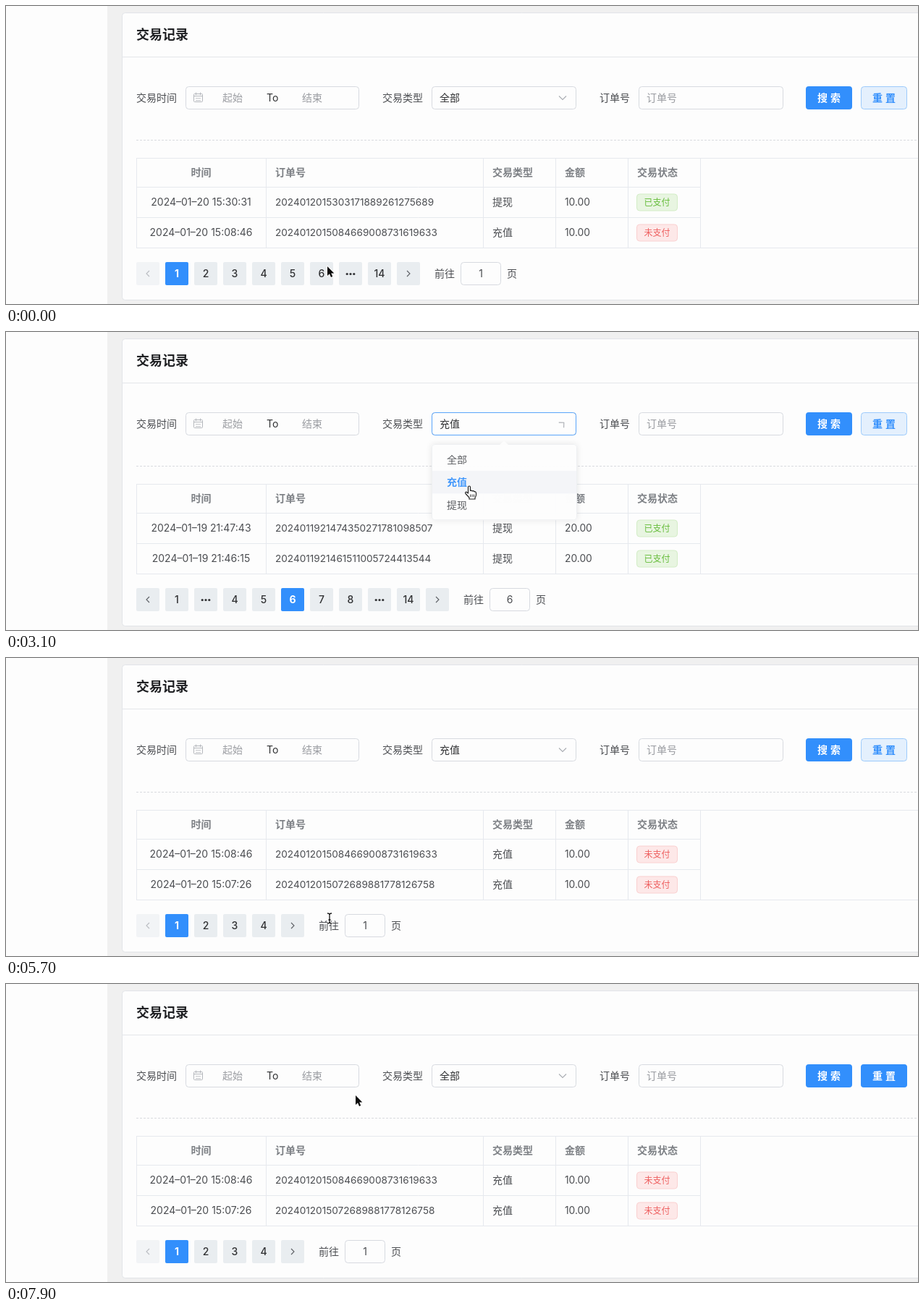
Animation of 1260 by 412 pixels, one loop 8000 ms. Source, as an HTML page with a canvas:

```html
<!DOCTYPE html>
<html lang="zh-CN">
<head>
<meta charset="utf-8">
<title>交易记录</title>
<style>
html, body { margin: 0; width: 100%; height: 100%; overflow: hidden; background: #fdfdfd; }
canvas { display: block; }
</style>
</head>
<body>
<canvas id="stage" width="1260" height="412"></canvas>
<script>
const ctx = document.getElementById('stage').getContext('2d');
const LOOP = 8000;
const FONT = 'Inter, "Noto Sans CJK SC", "Noto Sans CJK", sans-serif';
const BLUE = '#328ffc', LINE = '#e6e9ee', BORDER = '#d7dae0', PAPER = '#fdfdfd';
const INK = '#303133', BODY = '#4b4d51', MUTED = '#9b9da2';

// Moments at which the interface reacts
const PAGE_CLICK = 500, OPEN = 2247, PICK = 3050, SEARCH = 4750, RESULT = 4900, RESET = 6700;

const PAGES = [
  { current: '1', pager: ['<', '1', '2', '3', '4', '5', '6', '…', '14', '>'], rows: [
    ['2024–01–20 15:30:31', '2024012015303171889261275689', '提现', '10.00', true],
    ['2024–01–20 15:08:46', '2024012015084669008731619633', '充值', '10.00', false]] },
  { current: '6', pager: ['<', '1', '…', '4', '5', '6', '7', '8', '…', '14', '>'], rows: [
    ['2024–01–19 21:47:43', '2024011921474350271781098507', '提现', '20.00', true],
    ['2024–01–19 21:46:15', '2024011921461511005724413544', '提现', '20.00', true]] },
  { current: '1', pager: ['<', '1', '2', '3', '4', '>'], rows: [
    ['2024–01–20 15:08:46', '2024012015084669008731619633', '充值', '10.00', false],
    ['2024–01–20 15:07:26', '2024012015072689881778126758', '充值', '10.00', false]] }
];

// Pointer stops: time, x, y
const PATH = [
  [0, 444, 360], [400, 441, 367], [1300, 441, 367], [2050, 728, 133], [2500, 728, 133],
  [2850, 640, 214], [3150, 640, 214], [3700, 362, 366], [4020, 417, 356], [4100, 417, 356],
  [4500, 1132, 128], [4950, 1132, 128], [5500, 447, 360], [5750, 447, 360],
  [6350, 1194, 130], [7150, 1194, 130], [7700, 483, 154], [8000, 483, 154]
];

const clamp = v => Math.min(1, Math.max(0, v));
const ramp = (t, start, length) => clamp((t - start) / length);
const smooth = p => p * p * (3 - 2 * p);
const easeOut = p => 1 - (1 - p) ** 3;
const pulse = (t, on, off, length = 150) => ramp(t, on, length) - ramp(t, off, length);

function pointerAt(t) {
  const i = Math.max(1, PATH.findIndex(k => k[0] > t));
  const [t0, x0, y0] = PATH[i - 1], [t1, x1, y1] = PATH[i];
  const p = smooth(ramp(t, t0, t1 - t0));
  return [x0 + (x1 - x0) * p, y0 + (y1 - y0) * p];
}

function text(str, x, middle, color = BODY, size = 14, weight = 400, align = 'left') {
  ctx.font = `${weight} ${size}px ${FONT}`;
  ctx.textAlign = align;
  ctx.fillStyle = color;
  ctx.fillText(str, x, middle + size * 0.37);
}

function box(x, y, w, h, fill, stroke, radius = 4) {
  const inset = stroke ? 0.5 : 0;
  ctx.beginPath();
  ctx.roundRect(x + inset, y + inset, w - 2 * inset, h - 2 * inset, radius);
  if (fill) { ctx.fillStyle = fill; ctx.fill(); }
  if (stroke) { ctx.strokeStyle = stroke; ctx.lineWidth = 1; ctx.stroke(); }
}

function line(points, color, width = 1) {
  ctx.beginPath();
  points.forEach(([x, y]) => ctx.lineTo(x, y));
  ctx.strokeStyle = color;
  ctx.lineWidth = width;
  ctx.stroke();
}

function faded(alpha, draw) {
  ctx.save();
  ctx.globalAlpha *= alpha;
  draw();
  ctx.restore();
}

function chevron(x, y, angle, size, color) {
  ctx.save();
  ctx.translate(x, y);
  ctx.rotate(angle);
  line([[-size, -size / 2], [0, size / 2], [size, -size / 2]], color, 1.1);
  ctx.restore();
}

function drawFrame() {
  ctx.fillStyle = PAPER;
  ctx.fillRect(0, 0, 1260, 412);
  ctx.fillStyle = '#f0f0f0';
  ctx.fillRect(140, 0, 1120, 412);
  box(160, 9, 1120, 398, PAPER, '#e2e4e8');
  line([[160, 70.5], [1260, 70.5]], '#e4e6ea');
  text('交易记录', 180, 39.3, '#1f2023', 18, 700);
  ctx.setLineDash([3, 2]);
  line([[180, 185.5], [1260, 185.5]], '#d9dbdf');
  ctx.setLineDash([]);
}

function drawCalendar(x, y) {
  box(x, y + 1, 13, 12, null, '#b4b7bc', 1);
  line([[x, y + 4.5], [x + 13, y + 4.5]], '#b4b7bc');
  for (const dx of [3.5, 9.5]) line([[x + dx, y - 0.5], [x + dx, y + 3]], '#b4b7bc');
  for (const dy of [7.5, 10.5]) line([[x + 3, y + dy], [x + 10, y + dy]], '#c4c6ca');
}

function buttonLabel(first, second, x, color) {
  text(first, x + 16, 127, color, 14, 700);
  text(second, x + 34, 127, color, 14, 700);
}

function drawFilters(t) {
  text('交易时间', 180, 127);
  box(248, 111, 240, 32, PAPER, BORDER);
  drawCalendar(259, 120);
  text('起始', 299, 127, MUTED);
  text('To', 360, 127, INK);
  text('结束', 409, 127, MUTED);

  text('交易类型', 520, 127);
  box(588, 111, 200, 32, PAPER, BORDER);
  faded(pulse(t, 1950, 2400), () => box(588, 111, 200, 32, null, '#b4b7bd'));
  faded(pulse(t, 2310, SEARCH), () => box(588, 111, 200, 32, null, '#5aa5fa'));
  text(t > PICK && t < RESET ? '充值' : '全部', 599, 127, INK);
  const turn = p => 1 - (1 - p) ** 1.6;
  const turned = turn(ramp(t, OPEN, 300)) - turn(ramp(t, PICK, 300));
  chevron(769, 127, -Math.PI * turned, 5, '#a9acb2');

  text('订单号', 820, 127);
  box(874, 111, 200, 32, PAPER, BORDER);
  text('订单号', 885, 127, MUTED);

  box(1105, 111, 64, 32, BLUE);
  const searchHover = Math.max(pulse(t, 4380, 5000), pulse(t, 6180, 6390));
  faded(searchHover * 0.3, () => box(1105, 111, 64, 32, '#fff'));
  buttonLabel('搜', '索', 1105, '#fff');
  box(1181, 111, 64, 32, '#e4f0fd', '#9ccafb');
  buttonLabel('重', '置', 1181, BLUE);
  faded(ramp(t, 6410, 200), () => {
    box(1181, 111, 64, 32, BLUE);
    buttonLabel('重', '置', 1181, '#fff');
  });
}

function drawTag(paid, y) {
  const [fill, stroke, color] = paid
    ? ['#e8f5e1', '#d3edc6', '#67bd3c'] : ['#fde8e8', '#fad0d0', '#ee5f5f'];
  box(871, y - 12, 57, 24, fill, stroke);
  text(paid ? '已支付' : '未支付', 899.5, y, color, 12, 500, 'center');
}

function drawTable(rows) {
  for (const [y, right] of [[210, 1260], [250, 959], [292, 959], [334, 1260]])
    line([[180, y + 0.5], [right, y + 0.5]], LINE);
  for (const x of [180, 359, 659, 759, 859, 959])
    line([[x + 0.5, 210], [x + 0.5, 334]], LINE);

  text('时间', 269.5, 230, '#7d8085', 14, 700, 'center');
  [['订单号', 372], ['交易类型', 672], ['金额', 772], ['交易状态', 872]]
    .forEach(([label, x]) => text(label, x, 230, '#7d8085', 14, 700));

  rows.forEach(([time, order, type, amount, paid], i) => {
    const y = 271 + 42 * i;
    text(time, 269.5, y, BODY, 14, 400, 'center');
    text(order, 372, y, BODY, 13.6);
    text(type, 672, y);
    text(amount, 772, y, BODY, 13.8);
    drawTag(paid, y + 0.5);
  });
}

function drawPager({ current, pager }) {
  pager.forEach((label, i) => {
    const x = 180 + 40 * i, middle = x + 16, active = label === current;
    const disabled = label === '<' && current === '1';
    box(x, 354, 32, 32, active ? BLUE : disabled ? '#f2f4f6' : '#e9edf0', null, 2);
    if (label === '<') chevron(middle, 370, Math.PI / 2, 4, disabled ? '#b9bcc2' : '#5c5f64');
    else if (label === '>') chevron(middle, 370, -Math.PI / 2, 4, '#5c5f64');
    else if (label === '…') {
      ctx.fillStyle = INK;
      for (const dx of [-4.8, 0, 4.8]) {
        ctx.beginPath();
        ctx.arc(middle + dx, 370.5, 1.6, 0, 7);
        ctx.fill();
      }
    } else text(label, middle, 370, active ? '#fff' : INK, 14, active ? 700 : 500, 'center');
  });
  const x = 192 + 40 * pager.length;
  text('前往', x, 370);
  box(x + 36, 354, 56, 32, PAPER, BORDER);
  text(current, x + 64, 370, BODY, 14, 400, 'center');
  text('页', x + 100, 370);
}

function drawOptions(t, pointerY) {
  const shown = easeOut(ramp(t, OPEN, 300)) * (1 - smooth(ramp(t, PICK, 300)));
  if (!shown) return;
  ctx.save();
  ctx.globalAlpha = shown;
  ctx.translate(0, 155);
  ctx.scale(1, shown);
  ctx.shadowColor = 'rgba(0,0,0,.1)';
  ctx.shadowBlur = 10;
  box(588, 0, 201, 114, PAPER);
  ctx.shadowColor = 'transparent';
  box(588, 0, 201, 114, PAPER, '#eceef1');
  ctx.beginPath();
  ctx.moveTo(682, 1);
  ctx.lineTo(688, -5);
  ctx.lineTo(694, 1);
  ctx.fillStyle = PAPER;
  ctx.fill();
  ['全部', '充值', '提现'].forEach((label, i) => {
    const top = 6 + 34 * i;
    if (pointerY > 155 + top && pointerY < 189 + top) {
      ctx.fillStyle = '#f3f5f8';
      ctx.fillRect(589, top, 199, 34);
    }
    const chosen = i === (t > PICK ? 1 : 0);
    text(label, 609, top + 17, chosen ? BLUE : BODY, 14, chosen ? 700 : 400);
  });
  ctx.restore();
}

const ARROW = new Path2D('M0 0V13L3 10.3L5 15L7.2 14L5.2 9.5H9.3Z');
const HAND = new Path2D('M-1.5 9V.5Q-1.5-1 0-1Q1.5-1 1.5.5V5.5Q3 4.5 4.3 6Q6 5.2 7 6.8Q9.5 6.3 9.5 9V11Q9.5 13 8 15V17H0V15L-5 9.5Q-6 7.5-4.2 7Z');
const CREASES = new Path2D('M1.7 10.5V14M4.1 10.5V14M6.5 10.5V14');
const BEAM = new Path2D('M-3-7Q0-7 0-5Q0-7 3-7M0-5V5M-3 7Q0 7 0 5Q0 7 3 7M-1.5 2H1.5');

function drawPointer(t, x, y) {
  const inside = (x0, y0, x1, y1) => x >= x0 && x <= x1 && y >= y0 && y <= y1;
  const clickable = inside(588, 111, 788, 143) || inside(1105, 111, 1169, 143) ||
    inside(1181, 111, 1245, 143) || (t > OPEN && t < PICK + 150 && inside(588, 155, 789, 269));
  const overText = t > RESULT && inside(432, 358, 460, 382);
  const stroke = (path, color, width) => {
    ctx.strokeStyle = color;
    ctx.lineWidth = width;
    ctx.stroke(path);
  };
  ctx.save();
  ctx.translate(x, y);
  ctx.lineJoin = 'round';
  if (overText) {
    stroke(BEAM, '#fff', 3);
    stroke(BEAM, '#111', 1.3);
  } else if (clickable) {
    ctx.fillStyle = '#fff';
    ctx.fill(HAND);
    stroke(HAND, '#222', 1.2);
    stroke(CREASES, '#222', 0.9);
  } else {
    stroke(ARROW, '#fff', 2);
    ctx.fillStyle = '#0a0a0a';
    ctx.fill(ARROW);
  }
  ctx.restore();
}

function render(t) {
  const page = PAGES[t < PAGE_CLICK ? 0 : t < RESULT ? 1 : 2];
  const [x, y] = pointerAt(t);
  drawFrame();
  drawFilters(t);
  drawTable(page.rows);
  drawPager(page);
  drawOptions(t, y);
  drawPointer(t, x, y);
}

const start = performance.now();
function tick() {
  render((performance.now() - start) % LOOP);
  requestAnimationFrame(tick);
}
tick();
</script>
</body>
</html>
```
